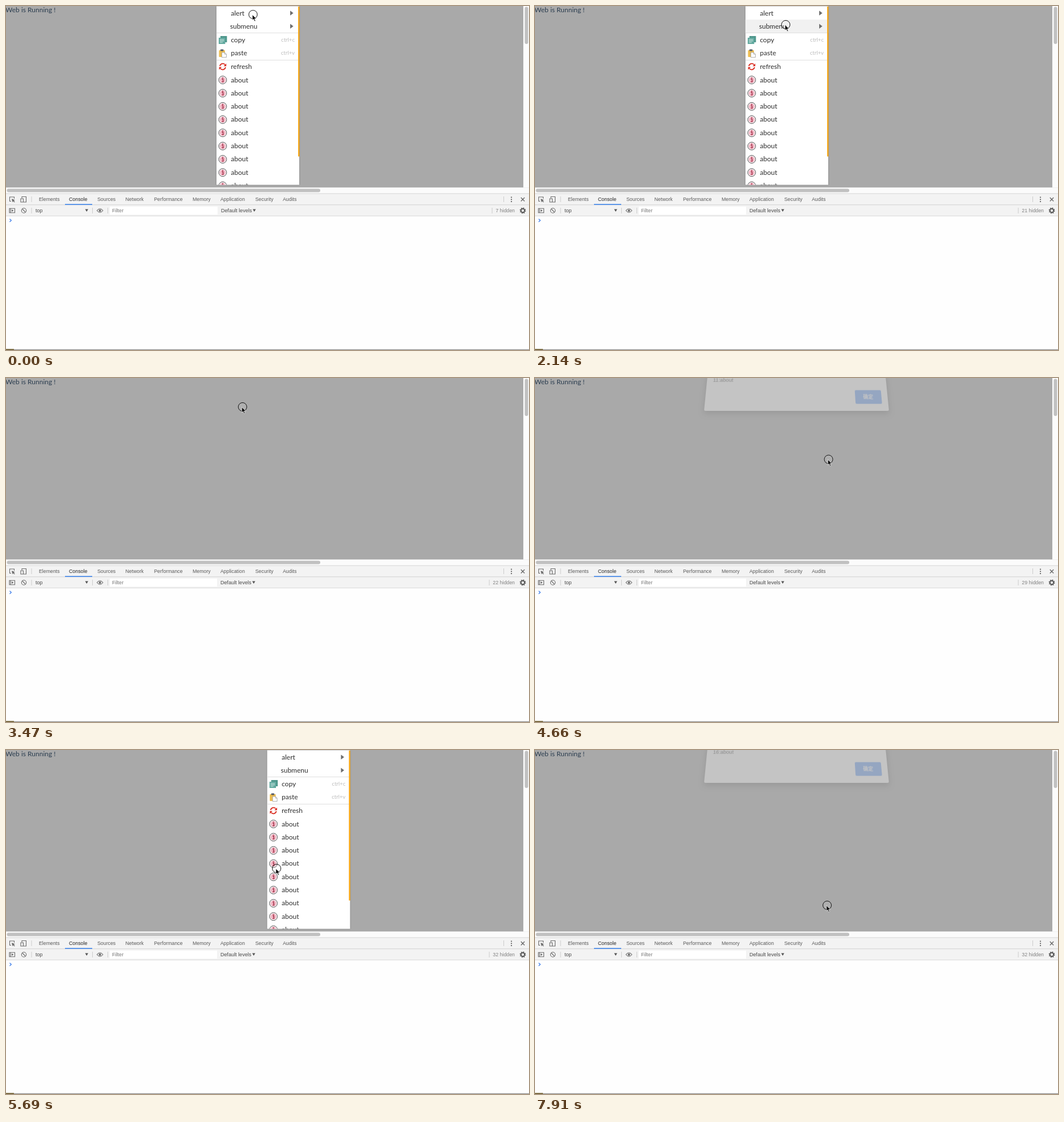
An HTML page that plays this animation: 922x607 px, repeating every 8 s.

```html
<!DOCTYPE html>
<html lang="en">
<head>
<meta charset="utf-8">
<title>Context menu</title>
<style>
html, body { margin: 0; width: 100%; height: 100%; overflow: hidden; background: #fff; }
#stage { position: relative; width: 922px; height: 607px; overflow: hidden; }
svg { position: absolute; left: 0; top: 0; }
text { white-space: pre; }
.lato { font: 12px Lato, sans-serif; fill: #2c2c2c; }
.key { font-size: 9.6px; fill: #bdbdbd; }
.tool { font: 8.8px "Liberation Sans", sans-serif; fill: #5a5a5a; }
.bar { font-size: 9.1px; fill: #4a4a4a; }
#dialog {
  position: absolute; left: 298px; top: -40px; width: 326px; height: 109px;
  background: #fff; border-radius: 2px; transform-origin: 50% 100%;
  box-shadow: 0 4px 11px rgba(0,0,0,.32), 0 0 1px rgba(0,0,0,.3);
  font: 9.6px "Liberation Sans", sans-serif; color: #444;
}
#dialog.tilt {
  opacity: .31;
  transform: translateY(-11px) perspective(58px) rotateX(2deg) scaleY(1.04);
}
#message { position: absolute; left: 11px; top: 49px; line-height: 12px; }
#ok {
  position: absolute; left: 267.5px; top: 73px; width: 47.5px; height: 24px;
  border-radius: 2px; background: #659cf6; color: #fff; text-align: center;
  font: bold 9px/24px "Noto Sans CJK SC", "Noto Sans CJK", sans-serif;
}
</style>
</head>
<body>
<div id="stage">
<svg width="922" height="607" viewBox="0 0 922 607">
  <defs>
    <clipPath id="menuClip"><rect x="0" y="1" width="147" height="314.5"/></clipPath>
    <filter id="soft" x="-10%" y="-10%" width="120%" height="120%">
      <feDropShadow dx="0" dy="0" stdDeviation="1.2" flood-opacity=".35"/>
    </filter>
    <g id="info">
      <circle r="6.9" fill="#fff" stroke="#4d4a4c" stroke-width="1"/>
      <circle r="5.3" fill="#f2b9c6"/>
      <path d="M-1.5-1H.7V3M-1.6 3.2H1.8" fill="none" stroke="#a83850" stroke-width="1.5"/>
      <circle cy="-3.2" r="1.1" fill="#a83850"/>
    </g>
    <path id="more" d="M0-4.2L5.6 0L0 4.2z" fill="#6d6d6d"/>
    <path id="down" d="M0 0h5.4l-2.7 4.6z" fill="#555"/>
  </defs>

  <rect width="922" height="320.5" fill="#a9a9a9"/>
  <text class="lato" x="-1" y="11.2" style="fill:#2c3e50">Web is Running !</text>
  <rect x="912" width="10" height="320.5" fill="#fcfcfc"/>
  <rect x="914.5" y="1.5" width="6" height="65.5" rx="3" fill="#c1c1c1"/>
  <rect y="320.5" width="922" height="10.5" fill="#fbfbfb"/>
  <rect x="1.5" y="322.5" width="552.5" height="6" rx="3" fill="#c1c1c1"/>

  <rect y="331" width="922" height="40" fill="#f3f3f3"/>
  <path d="M0 331h922M0 350.8h922M0 370.7h922" stroke="#ccc" stroke-width=".8"/>
  <rect x="104" y="349.4" width="48" height="1.6" fill="#3b82e8"/>
  <g id="tabs" class="tool"></g>
  <path d="M45 336v10M877.5 336v10M45 356v10M152.5 356v10M179.5 356v10" stroke="#ccc"/>
  <g fill="none" stroke="#6a6a6a" stroke-width="1.1">
    <path d="M9 344.5H6.5v-7.5h8v3"/>
    <path d="M10 340l6 2.4-2.5 1 2.2 2.2-1 1-2.2-2.2-1 2z" fill="#6a6a6a" stroke="none"/>
    <path d="M28 339v-2.5h7.5v9.5H31M26 340h4.5v6H26z"/>
    <path d="M6 357.3h9.500v7.500H6zM8 357v8"/>
    <path d="M10 359l3.500 2-3.500 2z" fill="#6a6a6a" stroke="none"/>
    <circle cx="31.500" cy="361" r="4.200"/><path d="M28.600 358l5.800 6"/>
    <path d="M160.300 361q5.300-6.500 10.600 0q-5.300 6.500-10.600 0z"/>
    <circle cx="165.600" cy="361" r="1.500" fill="#6a6a6a"/>
    <circle cx="911" cy="361" r="3.200" stroke="#5a5a5a" stroke-width="2"/>
    <circle cx="911" cy="361" r="4.700" stroke="#5a5a5a" stroke-width="1.500" stroke-dasharray="1.900 1.790"/>
    <path d="M907.800 338l6.400 6.400M914.200 338l-6.400 6.400" stroke-width="1.400"/>
  </g>
  <g fill="#5a5a5a"><circle cx="891" cy="337.500" r="1.100"/><circle cx="891" cy="341.300" r="1.100"/><circle cx="891" cy="345.100" r="1.100"/></g>
  <text class="tool bar" x="52" y="364">top</text>
  <use href="#down" x="139.500" y="358.500"/>
  <rect id="filter" x="183" y="354" width="190" height="14" fill="#fff"/>
  <text class="tool bar" x="187" y="364.300" style="fill:#777">Filter</text>
  <g id="levels">
    <text class="tool bar" x="379" y="364">Default levels</text>
    <use href="#down" x="435" y="358.500"/>
  </g>
  <path id="split" d="M857 356v10" stroke="#ccc"/>
  <text id="hidden" class="tool" x="897" y="364" text-anchor="end" style="fill:#808080"></text>
  <rect y="371" width="922" height="236" fill="#fefefe"/>
  <path d="M6.500 375.700l2.800 2.600-2.800 2.600" fill="none" stroke="#3f7ee8" stroke-width="1.300"/>
  <path d="M0 606.300h922" stroke="#777" stroke-width="1"/>
  <path d="M0 606h14" stroke="#6b5722" stroke-width="1.500"/>

  <g id="menu">
    <rect y=".5" x=".5" width="146" height="315" fill="#fff" filter="url(#soft)"/>
    <g clip-path="url(#menuClip)">
      <g id="list">
        <rect id="hover" y="1" width="147" height="23.300" fill="#f1f1f1"/>
        <path d="M0 47.500h145M0 95.500h145" stroke="#dedede"/>
        <use href="#more" x="130.500" y="12.500"/>
        <use href="#more" x="130.500" y="35.800"/>
        <g transform="translate(4.500 53)">
          <path d="M3 0h11.500v11H3z" fill="#4f978c"/>
          <path d="M0 3h11.500v11H0z" fill="#63aaa0"/>
          <path d="M2 6.200h7.500M2 8.600h7.500M2 11h5" stroke="#e0f0ed" stroke-width=".9"/>
        </g>
        <g transform="translate(5 76.500)">
          <rect y="1.500" width="10.500" height="12" rx="1" fill="#edbd52"/>
          <rect x="2.600" width="5.300" height="3" rx=".8" fill="#555c66"/>
          <path d="M5 5.500h5l3 3v5.700H5z" fill="#fff" stroke="#9a9a9a" stroke-width=".8"/>
          <path d="M10 5.500v3h3" fill="none" stroke="#9a9a9a" stroke-width=".8"/>
        </g>
        <g transform="translate(11.500 107)" fill="none" stroke="#d8281c" stroke-width="1.700">
          <path d="M-5-1A5.200 5.200 0 0 1 4-3.500M5 1A5.200 5.200 0 0 1-4 3.500"/>
          <path d="M6.300-5.500v4.800H1.700zM-6.300 5.500V.7h4.600z" fill="#d8281c" stroke="none"/>
        </g>
      </g>
    </g>
    <rect id="thumb" x="144.500" y="1" width="2.500" height="264.500" fill="#f5a81c"/>
    <g id="panel">
      <rect x="146.500" y=".5" width="91" height="46.500" fill="#fff" filter="url(#soft)"/>
      <text class="lato" x="173" y="16.500">alert1</text>
      <text class="lato" x="173" y="39.800">alert2</text>
    </g>
  </g>
</svg>

<div id="dialog"><div id="message"></div><div id="ok">确定</div></div>

<svg width="922" height="607" viewBox="0 0 922 607">
  <g id="cursor">
    <circle r="7.500" fill="#fff" fill-opacity=".08" stroke="#111" stroke-width="1"/>
    <path d="M-1.200.4v9.600l2.200-2 1.700 3.900 1.700-.7-1.700-3.800h3.100z" fill="#000" stroke="#fff" stroke-width=".7"/>
  </g>
</svg>
</div>

<script>
const LOOP = 8000, ROW = 23.33, MAX_SCROLL = 61;
const $ = id => document.getElementById(id);

function addText(parent, x, y, str, cls) {
  const el = document.createElementNS("http://www.w3.org/2000/svg", "text");
  el.setAttribute("x", x);
  el.setAttribute("y", y);
  if (cls) el.setAttribute("class", cls);
  el.textContent = str;
  parent.append(el);
  return el;
}

const tabs = { Elements: 58, Console: 111, Sources: 161, Network: 210.5, Performance: 261,
  Memory: 329, Application: 378, Security: 439.5, Audits: 488 };
for (const name in tabs) {
  const el = addText($("tabs"), tabs[name], 344.2, name);
  if (name === "Console") el.style.fill = "#222";
}

const list = $("list");
[["alert", 26, 16.5], ["submenu", 24.5, 39.8], ["copy", 26, 64], ["paste", 26, 87.3],
 ["refresh", 26, 111]].forEach(([s, x, y]) => addText(list, x, y, s, "lato"));
addText(list, 138.5, 63, "ctrl+c", "lato key").setAttribute("text-anchor", "end");
addText(list, 138.5, 86.3, "ctrl+v", "lato key").setAttribute("text-anchor", "end");
for (let i = 0; i < 11; i++) {
  const y = 130.5 + i * ROW;
  list.insertAdjacentHTML("beforeend", `<use href="#info" x="11.500" y="${y}"/>`);
  addText(list, 26, y + 4, "about", "lato");
}

// The picture is refreshed in bursts: [first, last, count]
const steps = [0, 7020, 7910];
[[450, 1250, 6], [1690, 2730, 8], [3030, 3470, 4], [3770, 4210, 4],
 [4660, 5690, 8], [5840, 6870, 8], [7320, 7460, 2]].forEach(([a, b, n]) => {
  for (let i = 0; i < n; i++) steps.push(a + (b - a) * i / (n - 1));
});
steps.sort((a, b) => a - b);

const path = [
  [0, 435.5, 15], [450, 436, 15], [1250, 441, 19], [1690, 443, 28], [2140, 442, 33],
  [2440, 442, 32], [2730, 442, 32], [3030, 440, 34], [3470, 417, 51], [3770, 418, 52],
  [4210, 515, 158], [4660, 517.5, 143.5], [4950, 516, 145], [5540, 461, 201],
  [5690, 477, 209], [6580, 497, 308], [6870, 500, 296], [7020, 501, 302],
  [7320, 506, 292], [7460, 511, 283], [7910, 515, 274]
];
const menus = [[0, 2280, 370.5], [3770, 4660, 417], [5530, 7910, 460]];
const dialogs = [[2280, 3170, "1:submenu"], [4660, 5240, "11:about"], [7910, 8800, "16:about"]];
const counts = [[0, 7], [600, 14], [1830, 21], [3030, 22], [3770, 29], [5100, 30], [5530, 32]];

const during = (spans, t) => spans.find(s => t >= s[0] && t < s[1]);
const ramp = (t, a, b) => Math.max(0, Math.min(1, (t - a) / (b - a)));
const show = (el, on) => el.style.display = on ? "" : "none";

function cursorAt(t) {
  const i = path.findLastIndex(p => p[0] <= t);
  const a = path[i], b = path[i + 1] || a;
  const k = a === b ? 0 : ramp(t, a[0], b[0]);
  return [a[1] + (b[1] - a[1]) * k, a[2] + (b[2] - a[2]) * k];
}

function draw(time) {
  const t = steps.findLast(s => s <= time);

  $("cursor").setAttribute("transform", `translate(${cursorAt(t)})`);

  const menu = during(menus, t);
  show($("menu"), menu);
  if (menu) {
    const k = t < 5000 ? ramp(t, 3770, 4210) : ramp(t, 5690, 6580);
    $("menu").setAttribute("transform", `translate(${menu[2]} 0)`);
    list.setAttribute("transform", `translate(0 ${-MAX_SCROLL * k})`);
    $("thumb").setAttribute("y", 1 + 50 * k);
  }
  show($("panel"), t >= 600 && t < 1830);
  show($("hover"), t >= 600 && t < 2280);
  $("hover").setAttribute("y", t < 1830 ? 1 : 24);

  const dialog = during(dialogs, t);
  show($("dialog"), dialog);
  if (dialog) {
    $("message").textContent = dialog[2];
    $("dialog").className = t - dialog[0] < 100 || dialog[1] - t < 150 ? "tilt" : "";
  }

  const count = counts.findLast(c => c[0] <= t)[1];
  const wide = count > 9;
  $("hidden").textContent = count + " hidden";
  $("split").setAttribute("transform", `translate(${wide ? -5 : 0} 0)`);
  $("levels").setAttribute("transform", `translate(${wide ? -1 : 0} 0)`);
  $("filter").setAttribute("width", wide ? 189 : 190);
}

const start = performance.now();
function tick() {
  draw((performance.now() - start) % LOOP);
  requestAnimationFrame(tick);
}
tick();
</script>
</body>
</html>
```
